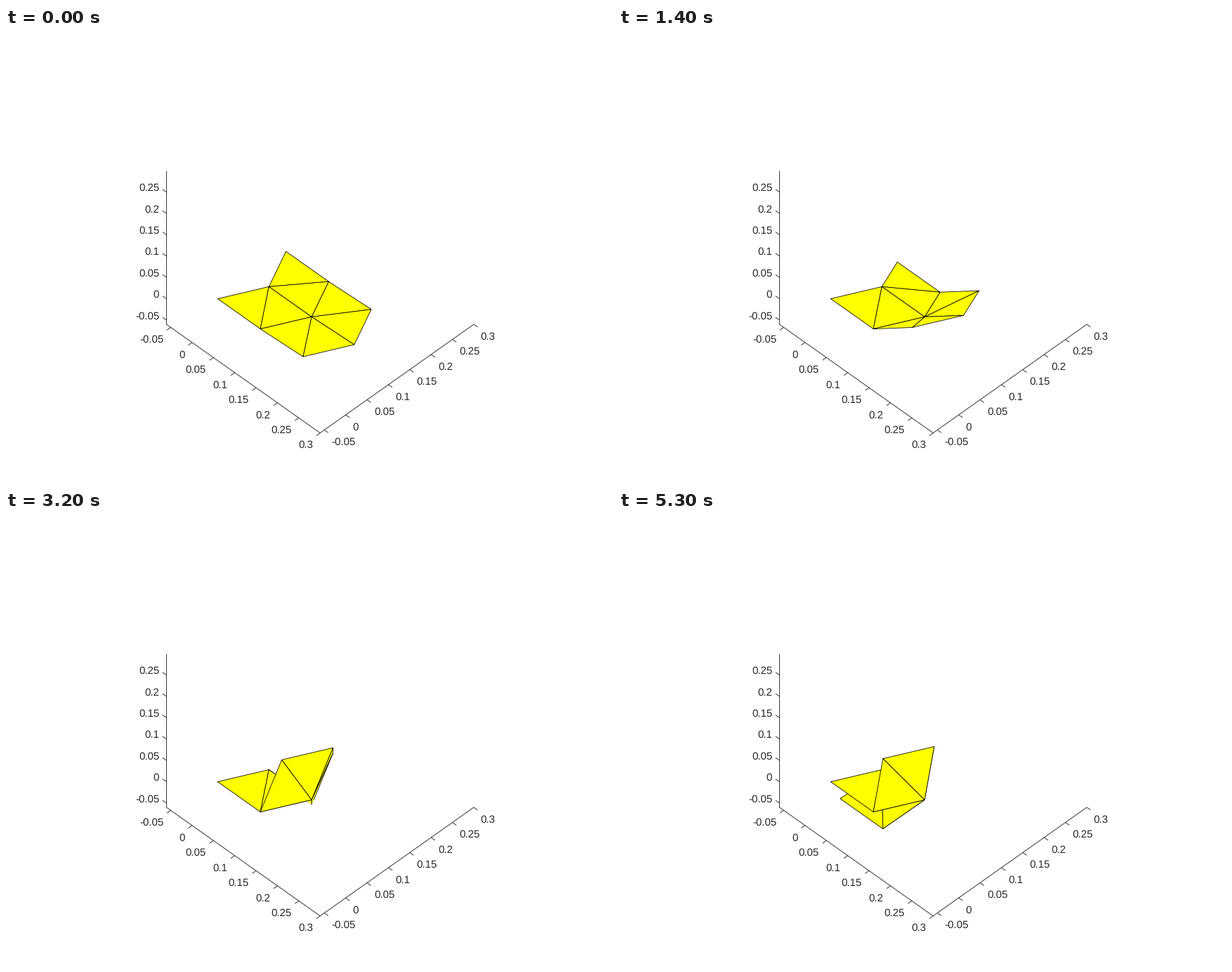
These frames come from a looping animation (864 by 648 pixels, 5400 ms). A matplotlib script:

```python
import numpy as np
import matplotlib.pyplot as plt
from matplotlib.animation import FuncAnimation
from matplotlib.patches import PathPatch
from matplotlib.path import Path

plt.rcParams["font.family"] = "Liberation Sans"
plt.rcParams["text.hinting"] = "none"

W, H, DPI = 864, 648, 100
PX = 72 / DPI                      # one pixel in points
LOW, HIGH = -0.06, 0.3             # axis limits, the same for x, y and z
SCALE = 607.7                      # pixels per unit, view from 45/45 degrees
TILT = SCALE * np.sqrt(0.5)
X0, Y0 = 301.27, 385.58
INK = "#262626"
STEP, HOLD, FRAMES = np.radians(2.88), 4, 54

# Sheet: two rows of two parallelograms with sides (a, 0) and (b, d)
a, b, d = 0.1, 0.04, 0.08
SIDE = np.hypot(b, d)
RATIO = b / SIDE


def project(p):
    x, y, z = p
    return X0 + SCALE * (x + y), Y0 + TILT * (x - y) - SCALE * z


def second_angle(theta):
    """Fold of the straight crease that belongs to a zigzag fold."""
    return 2 * np.arctan(RATIO * np.tan(theta / 2))


# All creases share one rest angle; the sheet settles at the least energy.
theta_grid = np.linspace(0, np.radians(175), 4000)
phi_grid = second_angle(theta_grid)
slope = np.gradient(phi_grid, theta_grid)
rest_grid = (theta_grid + slope * phi_grid) / (1 + slope)


def fold(step):
    """Vertices of the sheet, first panel held fixed."""
    theta = np.interp((step + 1) * STEP, rest_grid, theta_grid)
    phi = second_angle(theta)
    A = np.zeros(3)
    C = np.array([a, 0, 0])
    B = np.array([b, d, 0])
    D = B + C
    along = B * (a * b / SIDE**2)
    right = (along + (C - along) * np.cos(theta)
             + np.array([0, 0, a * d / SIDE]) * np.sin(theta))
    back = np.array([-b, d * np.cos(phi), -d * np.sin(phi)])
    return dict(A=A, B=B, C=C, D=D, E=C + right, F=D + right,
                G=D + back, H=B + back, I=D + right + back)


TRIANGLES = ["DGI", "DFI", "BGH", "BDG", "ABC", "BCD", "DEF", "CDE"]  # back to front


def clip_edge(p, q):
    """Part of the segment above the floor of the axes, or None."""
    if p[2] < LOW and q[2] < LOW:
        return None
    if p[2] >= LOW and q[2] >= LOW:
        return p, q
    cut = p + (q - p) * (LOW - p[2]) / (q[2] - p[2])
    return (cut, q) if p[2] < LOW else (p, cut)


fig = plt.figure(figsize=(W / DPI, H / DPI), dpi=DPI, facecolor="white")
ax = fig.add_axes([0, 0, 1, 1])
ax.set_xlim(0, W)
ax.set_ylim(H, 0)
ax.axis("off")


def line(p, q):
    ax.plot([p[0], q[0]], [p[1], q[1]], color=INK, lw=0.9 * PX,
            solid_capstyle="butt")


def tick(point, value, step, shift, align):
    x, y = project(point)
    line((x, y), (x + step[0], y + step[1]))
    ax.text(x + shift[0], y + shift[1], f"{value:g}", size=15 * PX,
            color=INK, ha=align, va="baseline")


def draw_axes():
    left, front, side = (LOW, LOW, LOW), (HIGH, LOW, LOW), (HIGH, HIGH, LOW)
    line(project((LOW, LOW, HIGH)), project(left))
    line(project(left), project(front))
    line(project(front), project(side))
    for i in range(-1, 7):
        v = round(0.05 * i, 2)
        tick((v, LOW, LOW), v, (-5.5, 3.9), (-10.2, 21.6), "right")
        tick((HIGH, v, LOW), v, (5.5, 3.9), (10, 21.6), "left")
        if i < 6:
            tick((LOW, LOW, v), v, (-5.5, -3.9), (-10.2, -1.6), "right")


draw_axes()
EMPTY = Path(np.zeros((1, 2)))
faces = []
for level in range(len(TRIANGLES)):
    fill = PathPatch(EMPTY, fc="#ffff00", ec="none", zorder=5 + level)
    edge = PathPatch(EMPTY, fc="none", ec="black", lw=0.8 * PX,
                     joinstyle="round", capstyle="butt", zorder=5.5 + level)
    ax.add_patch(fill)
    ax.add_patch(edge)
    faces.append((fill, edge))


def update(n):
    points = fold(max(0, n - HOLD))
    for name, (fill, edge) in zip(TRIANGLES, faces):
        corners = [points[c] for c in name]
        parts = [clip_edge(p, q) for p, q in zip(corners, corners[1:] + corners[:1])]
        ends = [project(p) for part in parts if part for p in part]
        if not ends:
            fill.set_path(EMPTY)
            edge.set_path(EMPTY)
            continue
        fill.set_path(Path(ends + ends[:1], closed=True))
        edge.set_path(Path(ends, [Path.MOVETO, Path.LINETO] * (len(ends) // 2)))
    return [p for pair in faces for p in pair]


anim = FuncAnimation(fig, update, frames=FRAMES, interval=100,
                     repeat=True, repeat_delay=0, blit=False)
plt.show()
```
